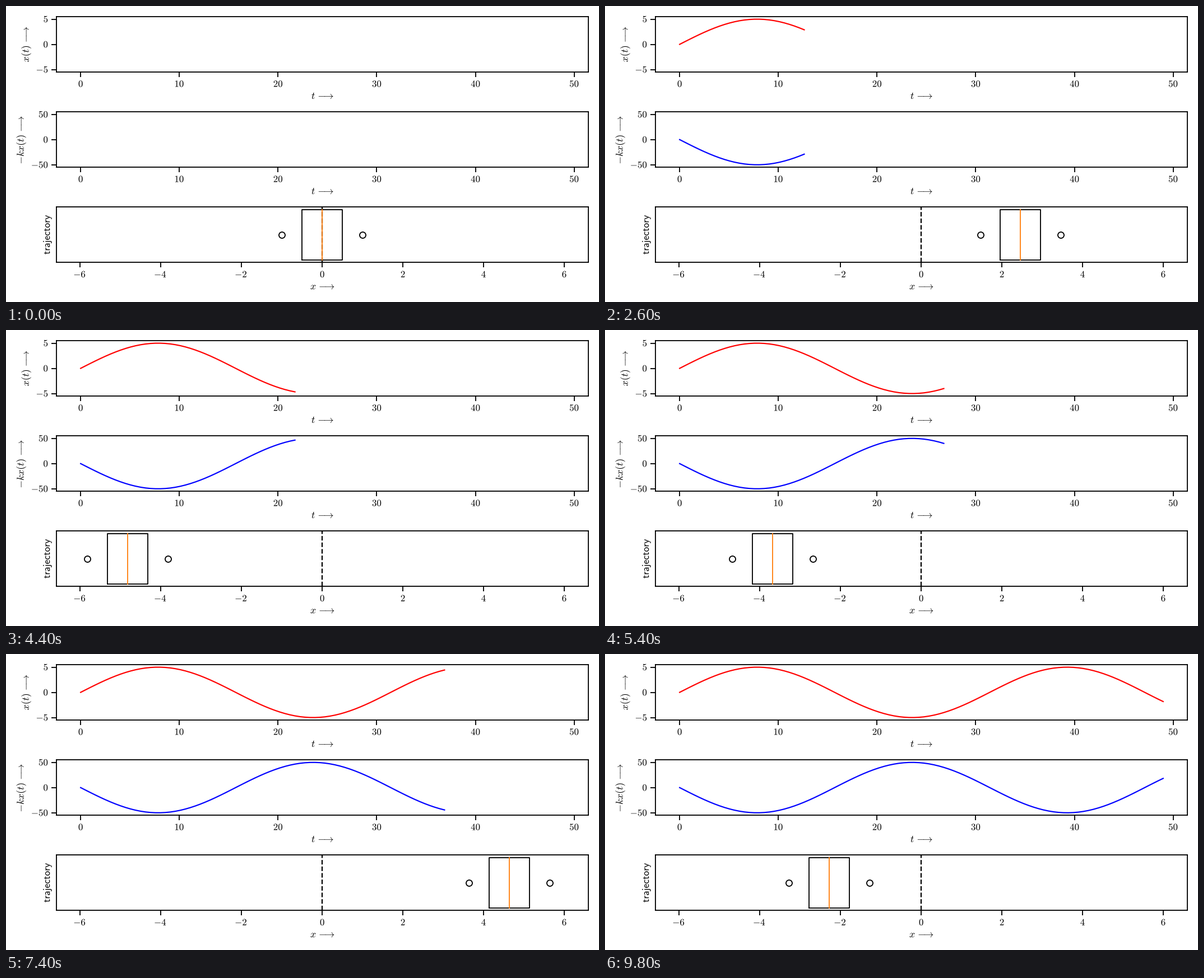
Recreate the animation shown at these times as a matplotlib script. Size 1058x529 px, loop 10 s.

```python
import matplotlib.pyplot as plt
import numpy as np
from matplotlib.animation import FuncAnimation
from matplotlib.patches import PathPatch
from matplotlib.textpath import TextPath
from matplotlib.transforms import Affine2D

W, H, DPI = 1058, 529, 132.25
LEFT, RIGHT, TOP, HEIGHT, PITCH = 90, 1038.95, 19.05, 99, 170.2
LABEL_SIZE, TICK_SIZE = 17.6, 16.9    # pixels
FRAMES = 50
ARROW = r"\hspace{0.32}{-}\hspace{-0.39}\rightarrow"

plt.rcParams.update({
    "mathtext.fontset": "cm",
    "axes.linewidth": 1,
    "lines.linewidth": 1.2,
})

t = np.linspace(0, 50, 100)
x = 5 * np.sin(0.2 * t)
force = -10 * x

fig = plt.figure(figsize=(W / DPI, H / DPI), dpi=DPI, facecolor="white")


def label(px, py, s, size=LABEL_SIZE, align=0.5, rotation=0):
    """Draw math text with its baseline at pixel (px, py)."""
    path = TextPath((0, 0), f"${s}$", size=size)
    box = path.get_extents()
    place = (Affine2D().translate(-box.x0 - align * box.width, 0)
             .rotate_deg(rotation).translate(px, H - py))
    fig.add_artist(PathPatch(path, color="black", lw=0, transform=place))


def panel(row, xticks, yticks):
    top = TOP + row * PITCH
    ax = fig.add_axes([LEFT / W, 1 - (top + HEIGHT) / H,
                       (RIGHT - LEFT) / W, HEIGHT / H])
    ax.set_xticks(xticks)
    ax.set_yticks(yticks)
    ax.tick_params(length=4.8, width=1, labelbottom=False, labelleft=False)
    return ax


def label_ticks(ax, row):
    bottom = TOP + row * PITCH + HEIGHT
    x0, x1 = ax.get_xlim()
    y0, y1 = ax.get_ylim()
    for v in ax.get_xticks():
        px = LEFT + (v - x0) / (x1 - x0) * (RIGHT - LEFT)
        label(px - (v < 0), bottom + 26.4, f"{v:.0f}", TICK_SIZE)
    for v in ax.get_yticks():
        py = bottom - (v - y0) / (y1 - y0) * HEIGHT
        label(74.2, py + 5.5, f"{v:.0f}", TICK_SIZE, align=1)


def time_plot(row, values, color, ticks):
    ax = panel(row, range(0, 51, 10), ticks)
    line, = ax.plot(t[:98], values[:98], color=color)
    ax.autoscale_view()
    ax.set_xlim(ax.get_xlim())
    ax.set_ylim(ax.get_ylim())
    label_ticks(ax, row)
    label(564.5, 166 + row * PITCH, "t" + ARROW)
    return line


x_line = time_plot(0, x, "red", [-5, 0, 5])
f_line = time_plot(1, force, "blue", [-50, 0, 50])
label(40.5, 68.8, "x(t)" + ARROW, rotation=90)
label(31.5, 239.3, "-kx(t)" + ARROW, rotation=90)

# Bottom panel: a box with two outliers riding on x(t)
ax = panel(2, range(-6, 7, 2), [])
centers = x[::2]
lo, hi = centers.min() - 1, centers.max() + 1
pad = 0.05 * (hi - lo)
ax.set(xlim=(lo - pad, hi + pad), ylim=(-0.55, 0.55))
label_ticks(ax, 2)
label(564.5, 166 + 2 * PITCH, "x" + ARROW)
label(78.3, 408.8, r"\mathsf{trajectory}", rotation=90)

ax.axvline(0, color="black", ls="--")
box, = ax.plot([], [], color="black", lw=1)
median, = ax.plot([], [], color="#ff7f0e", lw=1, zorder=2.1)
dots, = ax.plot([], [], "o", ms=6, mew=1, mfc="none", mec="black")


def update(i):
    n = 2 * i
    x_line.set_data(t[:n], x[:n])
    f_line.set_data(t[:n], force[:n])
    c = x[n]
    box.set_data(c + np.array([-0.5, 0.5, 0.5, -0.5, -0.5]),
                 [-0.5, -0.5, 0.5, 0.5, -0.5])
    median.set_data([c, c], [-0.5, 0.5])
    dots.set_data([c - 1, c + 1], [0, 0])
    return x_line, f_line, box, median, dots


anim = FuncAnimation(fig, update, frames=FRAMES, interval=200,
                     repeat=True, repeat_delay=0, blit=False)
plt.show()
```
